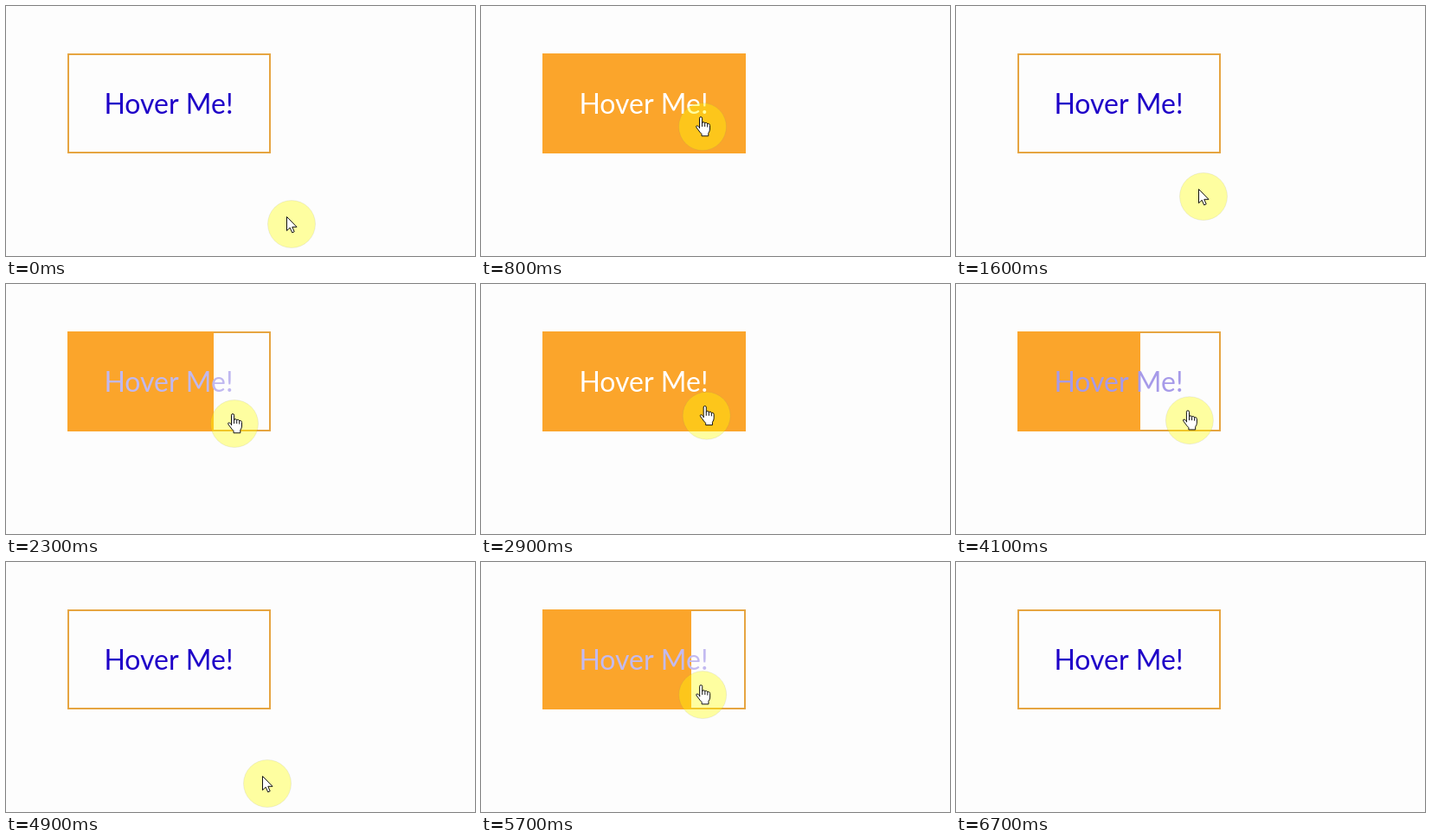
These frames come from a looping animation (542 px wide and 290 px high, 7600 ms). An HTML page with a canvas:

```html
<!DOCTYPE html>
<html lang="en">
<head>
<meta charset="utf-8">
<title>Hover button</title>
<style>
html, body { margin: 0; width: 100%; height: 100%; overflow: hidden; background: #fdfdfd; }
canvas { display: block; }
</style>
</head>
<body>
<canvas id="stage" width="542" height="290"></canvas>
<script>
const ctx = document.getElementById('stage').getContext('2d');
const LOOP = 7600, STEP = 100, FADE = 200;
const TIME_IN = 650, TIME_OUT = 550;
const BOX = { x: 71, y: 55, w: 235, h: 116 };
const EDGE = BOX.y + BOX.h + 3; // pointer height at which hovering flips
const BLUE = [30, 0, 200];

// Pointer stops, alternately outside and inside the button: arrival time, x, y
const STOPS = [
  [0, 330, 253], [750, 256, 140],
  [1600, 286, 221], [2465, 259.8, 150.7],
  [3400, 297, 241], [4300, 262, 134],
  [4900, 302, 257], [5850, 249, 138],
  [6700, 372, 325]
];

const ARROW = new Path2D('M0 0V16.2L3.7 12.7L6.2 18.4L8.7 17.3L6.3 11.8H11.5Z');
const HAND = new Path2D('M4.5 14V2.2Q4.5 .7 6 .7Q7.6 .7 7.6 2.2V8Q7.6 6.7 9.1 6.7Q10.6 6.7 10.7 8.2' +
  'Q11 7.2 12.3 7.4Q13.6 7.6 13.7 9Q14 8.2 15.2 8.6Q16.5 9 16.5 10.5V15Q16.5 17 14.8 19.5V22.8H7V20.5' +
  'Q4.5 18 3.3 16L1 13Q.2 11.6 1.2 10.9Q2.4 10.3 4.5 13Z');
const KNUCKLES = new Path2D('M7.6 8V12M10.7 8.2V12M13.7 9V12.5');

const clamp = v => Math.min(1, Math.max(0, v));
const lerp = (a, b, k) => a + (b - a) * k;
const smooth = u => u * u * (3 - 2 * u);
const unsmooth = s => 0.5 - Math.sin(Math.asin(1 - 2 * s) / 3);
const bezier = (a, b, s) => 3 * a * s * (1 - s) ** 2 + 3 * b * s * s * (1 - s) + s ** 3;

// CSS "ease" timing
function ease(u) {
  if (u <= 0 || u >= 1) return clamp(u);
  let lo = 0, hi = 1;
  for (let i = 0; i < 24; i++) {
    const mid = (lo + hi) / 2;
    if (bezier(0.25, 0.25, mid) < u) lo = mid; else hi = mid;
  }
  return bezier(0.1, 1, lo);
}

// Each leg leads to the next stop and crosses the button's edge once
const LEGS = STOPS.slice(1).map(([end, x, y], i) => {
  const inward = i % 2 === 0;
  const time = inward ? TIME_IN : TIME_OUT;
  const start = end - time;
  const y0 = STOPS[i][2];
  const cross = start + time * unsmooth((EDGE - y0) / (y - y0));
  return { start, time, x, y, cross, sign: inward ? 1 : -1 };
});

function pointerAt(t) {
  let [, x, y] = STOPS[0];
  for (const leg of LEGS) {
    const k = smooth(clamp((t - leg.start) / leg.time));
    x = lerp(x, leg.x, k);
    y = lerp(y, leg.y, k);
  }
  return [x, y];
}

const fillAt = t => LEGS.reduce((sum, leg) => sum + leg.sign * ease((t - leg.cross) / FADE), 0);

function drawButton(fill) {
  const { x, y, w, h } = BOX;
  ctx.strokeStyle = '#e6a541';
  ctx.lineWidth = 2;
  ctx.strokeRect(x + 1, y + 1, w - 2, h - 2);
  ctx.fillStyle = '#fba52b';
  ctx.fillRect(x, y, Math.round(w * fill), h);

  ctx.font = '32px Lato, sans-serif';
  ctx.textAlign = 'center';
  ctx.fillStyle = `rgb(${BLUE.map(c => Math.round(lerp(c, 255, fill)))})`;
  ctx.fillText('Hover Me!', x + w / 2 - 0.5, 125);
}

function drawPointer([x, y]) {
  ctx.beginPath();
  ctx.arc(x, y, 27.5, 0, 2 * Math.PI);
  ctx.fillStyle = 'rgba(255, 255, 0, 0.37)';
  ctx.fill();
  ctx.strokeStyle = 'rgba(120, 120, 120, 0.12)';
  ctx.lineWidth = 1;
  ctx.stroke();

  const hovering = y < EDGE;
  const shape = hovering ? HAND : ARROW;
  ctx.save();
  if (hovering) ctx.translate(x - 8, y - 12);
  else ctx.translate(x - 5.5, y - 8.5);
  ctx.fillStyle = '#fff';
  ctx.strokeStyle = '#111';
  ctx.fill(shape);
  ctx.stroke(shape);
  if (hovering) ctx.stroke(KNUCKLES);
  ctx.restore();
}

function draw(t) {
  ctx.fillStyle = '#fdfdfd';
  ctx.fillRect(0, 0, 542, 290);
  drawButton(clamp(fillAt(t)));
  drawPointer(pointerAt(t));
}

const begin = performance.now();
function tick() {
  const t = (performance.now() - begin) % LOOP;
  draw(Math.floor(t / STEP) * STEP);
  requestAnimationFrame(tick);
}
tick();
</script>
</body>
</html>
```
